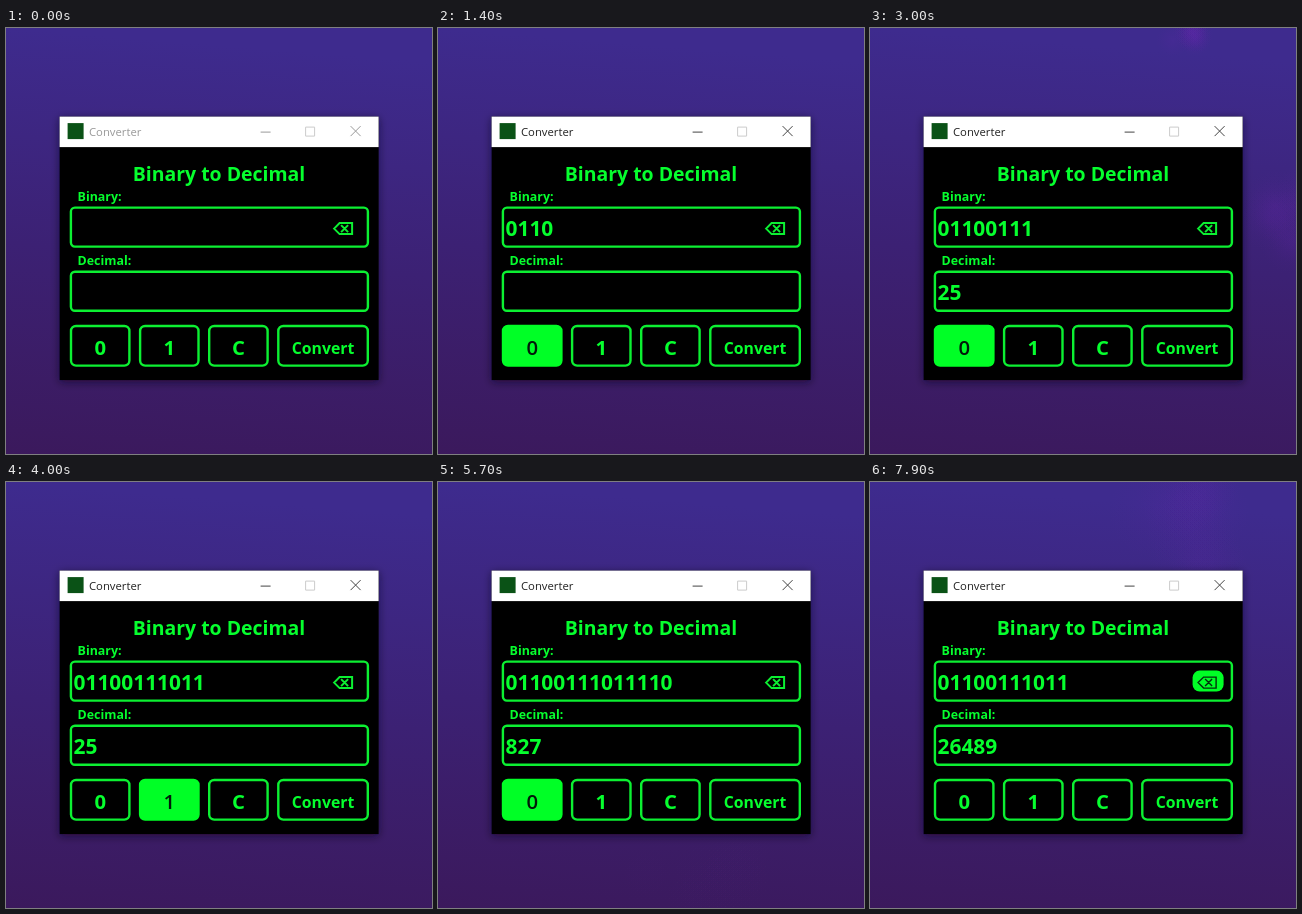
Write an HTML page that moves like this. It is 426x426 px and loops after 8 s.

```html
<!DOCTYPE html>
<html lang="en">
<head>
<meta charset="utf-8">
<title>Converter</title>
<style>
  html, body { margin: 0; width: 100%; height: 100%; overflow: hidden; background: #3c2274; }
  svg { display: block; width: 100vw; height: 100vh; }
  text { font: 700 20.9px "Open Sans", "Noto Sans", sans-serif; fill: #06ff2e; white-space: pre; }
  .mid { text-anchor: middle; }
  .title { font-size: 19.45px; }
  .label { font-size: 12.4px; }
  .box { fill: #000; stroke: #0cf032; stroke-width: 2.4; }
  .on .box { fill: #00ff26; stroke: #00ff26; }
  .on text { fill: #02180a; font-weight: 600; }
  #back rect { fill: none; }
  #back path { fill: none; stroke: #0cf032; stroke-width: 2; }
  #back.on rect { fill: #00ff26; }
  #back.on path { stroke: #02300c; stroke-width: 1.4; }
  #bar text { font-size: 11.3px; font-weight: 400; fill: #222; }
  #bar path { fill: none; stroke: #444; }
  #bar.idle text { fill: #999; }
  #bar.idle path { stroke: #999; }
  #bar path.off { stroke: #ccc; }
</style>
</head>
<body>
<svg viewBox="0 0 426 426">
  <defs>
    <linearGradient id="sky" x1="0" y1="0" x2="-.08" y2="1">
      <stop offset="0" stop-color="#3e2b8e"/>
      <stop offset=".5" stop-color="#3c2174"/>
      <stop offset="1" stop-color="#3b195c"/>
    </linearGradient>
    <radialGradient id="puff">
      <stop offset="0" stop-color="#7424bc"/>
      <stop offset=".5" stop-color="#6c22b0" stop-opacity=".55"/>
      <stop offset="1" stop-color="#6020a4" stop-opacity="0"/>
    </radialGradient>
    <filter id="shade" x="-10%" y="-10%" width="120%" height="120%">
      <feDropShadow dx="0" dy="2" stdDeviation="4" flood-color="#0a0420" flood-opacity=".6"/>
    </filter>
  </defs>
  <rect width="426" height="426" fill="url(#sky)"/>
  <g id="smoke"></g>
  <g transform="translate(-.4 -.4)">
    <rect x="54" y="89" width="319" height="263.500" filter="url(#shade)"/>
    <g id="bar">
      <rect x="54" y="89" width="319" height="30.500" fill="#fff"/>
      <rect x="62" y="95.500" width="16" height="16" fill="#0a5216"/>
      <text x="83.400" y="108.400">Converter</text>
      <path d="M255 104.500h10M345 98.500l10 10m0-10l-10 10"/>
      <path class="off" d="M300 99.500h9v9h-9z"/>
    </g>
    <text class="mid title" x="213.400" y="153">Binary to Decimal</text>
    <text class="label" x="72" y="173">Binary:</text>
    <text class="label" x="72" y="237">Decimal:</text>
    <rect class="box" x="65.300" y="180" width="297" height="39" rx="4"/>
    <rect class="box" x="65.300" y="244.200" width="297" height="39" rx="4"/>
    <text id="binary" x="68" y="208.400"></text>
    <text id="decimal" x="68" y="272.400"></text>
    <g id="back">
      <rect x="323" y="189" width="31" height="21" rx="7"/>
      <path d="M328.500 201l5.500-5.500h12.500v11h-12.500zM335.500 197.500l7 7m0-7l-7 7"/>
    </g>
    <g id="keys"></g>
  </g>
</svg>
<script>
const LOOP = 8000;
const $ = id => document.getElementById(id);
const smooth = p => { p = Math.min(1, Math.max(0, p)); return p * p * (3 - 2 * p); };
const lerp = (a, b, p) => a + (b - a) * p;

// '=' stands for Convert, '<' for backspace
const pads = ['0', '1', 'C', '='].map((key, i) => ({
  key, id: 'key' + i, x: 65.4 + 69.1 * i, y: 298.4, w: key === '=' ? 89.5 : 58.4, h: 39.6
}));
$('keys').innerHTML = pads.map(({ key, id, x, y, w, h }) => {
  const wide = key === '=';
  return `<g id="${id}"><rect class="box" x="${x}" y="${y}" width="${w}" height="${h}" rx="5"/>
    <text class="mid" x="${x + w / 2}" y="${wide ? 326 : 327}" style="font-size:${wide ? 15.8 : 20.3}px">${wide ? 'Convert' : key}</text></g>`;
}).join('');
pads.push({ key: '<', id: 'back', x: 323, y: 189, w: 31, h: 21 });

// each run of presses is spread evenly between its two times
const runs = [['011001=', 500, 2000], ['11011=', 2400, 4400], ['11001=', 5200, 6400], ['<<<<<', 6950, 7750]];
const presses = runs.flatMap(([keys, from, to]) => [...keys].map((key, i) => {
  const { x, y, w, h } = pads.find(pad => pad.key === key);
  return { key, time: lerp(from, to, i / (keys.length - 1)), x: x + w / 2, y: y + h / 2 };
}));
const start = { time: 0, x: 94, y: 390 };

function typedAt(t) {
  let binary = '', decimal = '';
  for (const { key, time } of presses) {
    if (time > t) break;
    if (key === '<') binary = binary.slice(0, -1);
    else if (key === '=') decimal = parseInt(binary, 2);
    else binary += key;
  }
  return { binary, decimal };
}

// the pointer rests on a pad, then glides to the next one
function hoverAt(t) {
  const next = presses.findIndex(press => press.time > t);
  const b = presses.at(next), a = next < 0 ? b : presses[next - 1] || start;
  const p = a === b ? 1 : smooth(((t - a.time) / (b.time - a.time) - 0.2) / 0.5);
  const px = lerp(a.x, b.x, p), py = lerp(a.y, b.y, p);
  return pads.find(({ x, y, w, h }) => px >= x && px <= x + w && py >= y && py <= y + h);
}

let seed = 7;
const random = () => (seed = seed * 16807 % 2147483647) / 2147483647;
const around = (center, spread) => center + (random() * 2 - 1) * spread;

// bursts of smoke: peak time, centre, spread
const bursts = [[3000, 315, 2, 12], [3000, 410, 190, 30], [4900, 250, 400, 50],
  [6700, 320, 45, 65], [6700, 390, 335, 45], [7900, 315, 45, 45]];
const puffs = bursts.flatMap(([peak, x, y, spread]) => Array.from({ length: 8 }, () => ({
  peak, x: around(x, spread), y: around(y, spread), r: 10 + spread * (0.4 + random() * 0.5),
  drift: around(4, 4), strength: 6 / (40 + spread)
})));
$('smoke').innerHTML = puffs.map(({ r }) => `<circle r="${r}" fill="url(#puff)"/>`).join('');
const clouds = [...$('smoke').children];

function draw() {
  const t = performance.now() % LOOP;
  const { binary, decimal } = typedAt(t);
  const hover = hoverAt(t);
  $('binary').textContent = binary;
  $('decimal').textContent = decimal;
  for (const pad of pads) $(pad.id).classList.toggle('on', pad === hover);
  $('bar').classList.toggle('idle', !binary);
  puffs.forEach(({ peak, x, y, drift, strength }, i) => {
    const s = (t - peak) / 1000;
    clouds[i].setAttribute('cx', x + drift * s);
    clouds[i].setAttribute('cy', y + drift * s);
    clouds[i].setAttribute('opacity', strength * smooth(1 - Math.abs(s)));
  });
  requestAnimationFrame(draw);
}
draw();
</script>
</body>
</html>
```
